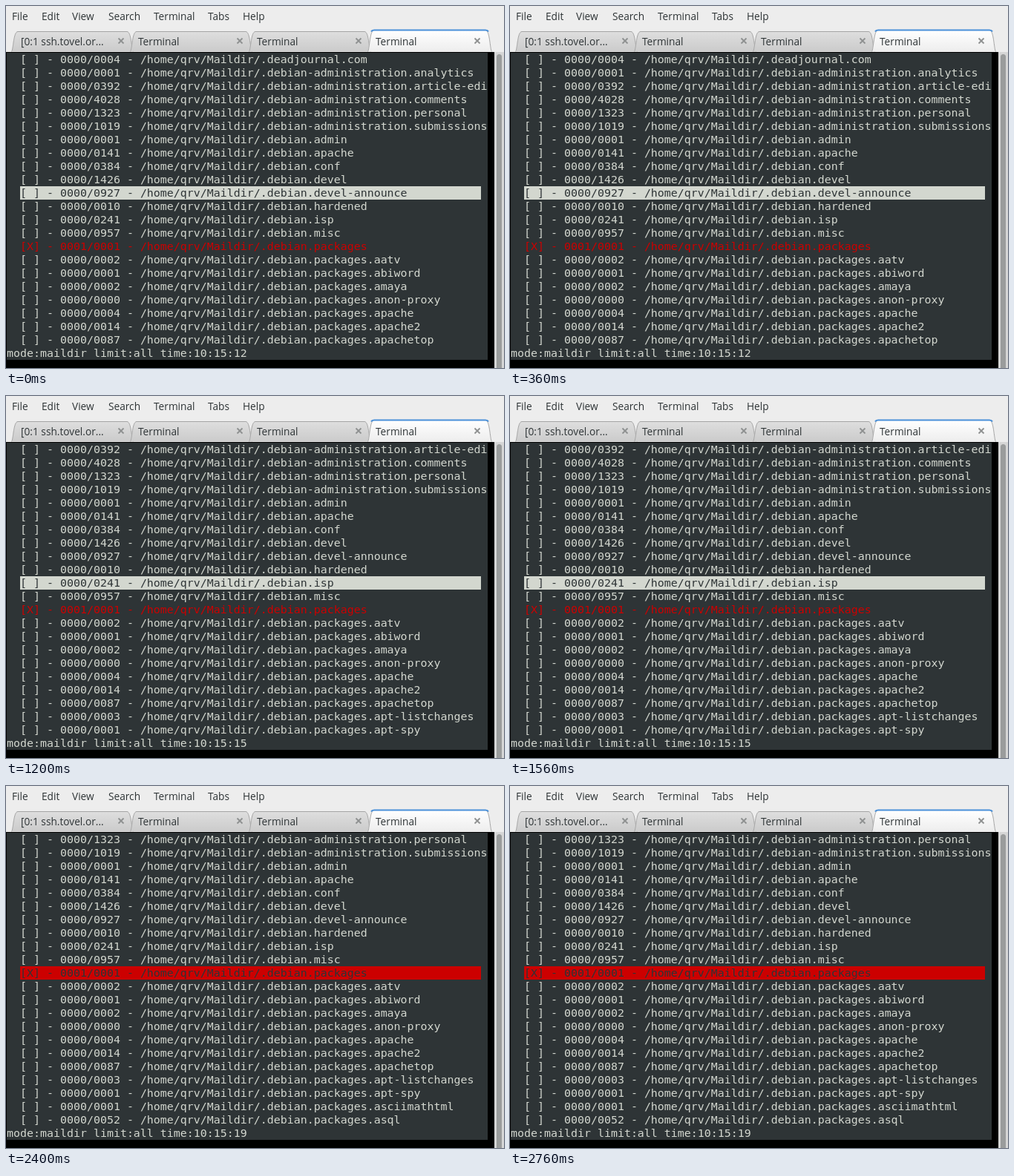
Animation of 671 by 488 pixels, one loop 3 s. Source, as an HTML page:

```html
<!DOCTYPE html>
<html lang="en">
<head>
<meta charset="utf-8">
<title>Mail folders</title>
<style>
  html, body { margin: 0; width: 100%; height: 100%; overflow: hidden; background: #ededed; }
  svg { position: absolute; left: 0; top: 0; }
  svg text { font: 13.7px "Open Sans", "Noto Sans", sans-serif; fill: #2e3436; }
  #term {
    position: absolute; left: 1px; top: 63px; width: 648px; height: 414px;
    overflow: hidden; background: #2e3436; color: #d3d7cf;
    font: 14.95px/18px "DejaVu Sans Mono", monospace; white-space: pre;
  }
  #term div { height: 18px; }
  #term .row { margin-left: 18px; width: 630px; }
  .new { color: #c00; }
  #term .sel { width: 621px; background: #d3d7cf; color: #2e3436; }
  #term .sel.new { background: #c00; }
</style>
</head>
<body>
<svg width="671" height="488" viewBox="0 0 671 488">
  <defs>
    <linearGradient id="idle" x2="0" y2="1">
      <stop stop-color="#dedede"/><stop offset="1" stop-color="#cbcbcb"/>
    </linearGradient>
    <linearGradient id="live" x2="0" y2="1">
      <stop stop-color="#fff"/><stop offset="1" stop-color="#ededed"/>
    </linearGradient>
  </defs>
  <g id="menu"></g>
  <g id="tabs"></g>
  <rect y="62" width="658" height="426"/>
  <rect x="658" y="62" width="13" height="426" fill="#d6d6d6"/>
  <rect x="661" y="65" width="7" height="430" rx="3.5" fill="#9a9c9c"/>
</svg>
<div id="term"></div>
<script>
const $ = id => document.getElementById(id);

const menu = [["File", 8], ["Edit", 48], ["View", 89], ["Search", 138],
  ["Terminal", 199], ["Tabs", 272], ["Help", 319]];
$("menu").innerHTML = menu.map(([t, x]) => `<text x="${x}" y="19">${t}</text>`).join("");

function tab(label, i) {
  const x = 8 + 160 * i, live = i === 3, r = x + (live ? 166 : 163), y = live ? 32.5 : 34.5;
  const shape = `M${x - .5} 61.5C${x + 2} 58 ${x + 2} ${y} ${x + 8} ${y}` +
    `H${r - 8}C${r - 2} ${y} ${r - 2} 58 ${r + .5} 61.5`;
  const accent = live
    ? `<path d="M${x + 4} 34.5Q${x + 5} 32.5 ${x + 8} 32.5H${r - 8}Q${r - 5} 32.5 ${r - 4} 34.5" fill="none" stroke="#4a90d9" stroke-width="2"/>`
    : "";
  const cx = x + 147;
  return `<path d="${shape}" fill="url(#${live ? "live" : "idle"})" stroke="#a5a5a5"/>${accent}
    <text x="${x + (i ? 10 : 12)}" y="53">${label}</text>
    <path d="M${cx - 3.5} 43.5l7 7m0 -7l-7 7" stroke="#8e9090" stroke-width="1.8"/>`;
}
$("tabs").innerHTML =
  ["[0:1 ssh.tovel.or...", "Terminal", "Terminal", "Terminal"].map(tab).join("");

const folders = `0004 deadjournal.com
0001 debian-administration.analytics
0392 debian-administration.article-edi
4028 debian-administration.comments
1323 debian-administration.personal
1019 debian-administration.submissions
0001 debian.admin
0141 debian.apache
0384 debian.conf
1426 debian.devel
0927 debian.devel-announce
0010 debian.hardened
0241 debian.isp
0957 debian.misc
0001 debian.packages
0002 debian.packages.aatv
0001 debian.packages.abiword
0002 debian.packages.amaya
0000 debian.packages.anon-proxy
0004 debian.packages.apache
0014 debian.packages.apache2
0087 debian.packages.apachetop
0003 debian.packages.apt-listchanges
0001 debian.packages.apt-spy
0001 debian.packages.asciimathtml
0052 debian.packages.asql`.split("\n").map(line => line.split(" "));

const UNREAD = 14, CURSOR = 10, VISIBLE = 22, STEP = 600;
const seconds = [12, 14, 15, 17, 19];

function row([total, name], i, top) {
  const unread = i === UNREAD;
  const cls = "row" + (unread ? " new" : "") + (i - top === CURSOR ? " sel" : "");
  return `<div class="${cls}">[${unread ? "X" : " "}] - ${unread ? "0001" : "0000"}/${total}` +
    ` - /home/qrv/Maildir/.${name}</div>`;
}

function draw(top) {
  $("term").innerHTML =
    folders.slice(top, top + VISIBLE).map((f, i) => row(f, i + top, top)).join("") +
    `<div>mode:maildir limit:all time:10:15:${seconds[top]}</div>`;
}

const start = performance.now();
let shown = -1;
function tick() {
  const step = Math.floor((performance.now() - start) / STEP) % seconds.length;
  if (step !== shown) draw(shown = step);
  requestAnimationFrame(tick);
}
tick();
</script>
</body>
</html>
```
